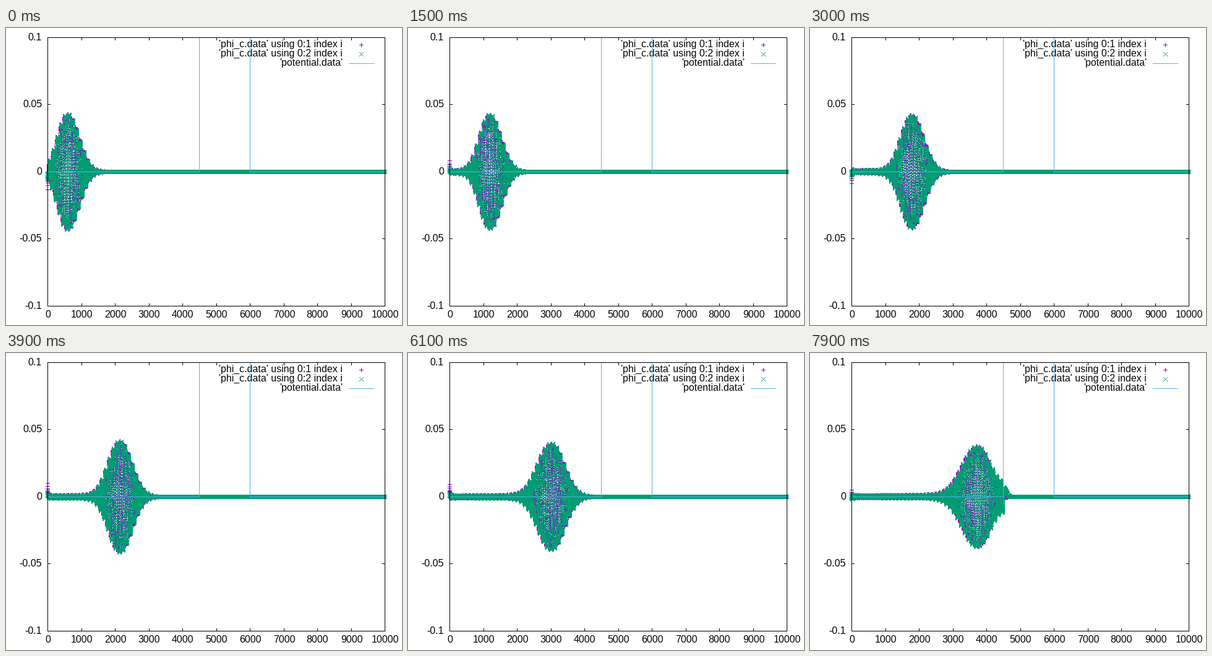
A matplotlib script that plays this animation: 640 px wide and 480 px high, repeating every 8000 ms.

```python
import numpy as np
import matplotlib.pyplot as plt
from matplotlib.animation import FuncAnimation
from matplotlib.patches import Rectangle
from matplotlib.path import Path

W, H, DPI = 640, 480, 80
PX = 72 / DPI                       # one pixel in points
LEFT, RIGHT, TOP, BOTTOM, ZERO = 67, 612, 15, 449, 232
TIC = 4
PURPLE, GREEN, BLUE = "#9400d3", "#009e73", "#56b4e9"
FRAMES, WALL, WALL_END = 80, 4500, 6000
K, OMEGA = 2 * np.pi / 110, 1.137   # wave number, phase step per frame
REFLECT = np.exp(1.916j)

plt.rcParams["font.family"] = "Liberation Sans"
plt.rcParams["text.hinting"] = "default"
x = np.arange(10001.0)


def col(v):
    return np.rint(LEFT + v * (RIGHT - LEFT) / 10000)


def row(v):
    return np.rint(ZERO - v * (BOTTOM - TOP) / 0.2)


def pixel_marker(cells):
    """Marker built from unit squares, so that it stays crisp."""
    square = [(0, 0), (1, 0), (1, -1), (0, -1), (0, 0)]
    verts = [(i + a, j + b) for i, j in cells for a, b in square]
    codes = [Path.MOVETO] + [Path.LINETO] * 3 + [Path.CLOSEPOLY]
    return Path(verts, codes * len(cells))


arm = range(-3, 4)
PLUS = pixel_marker([(i, 0) for i in arm] + [(0, i) for i in arm if i])
CROSS = pixel_marker([(i, i) for i in arm] + [(i, -i) for i in arm if i])


def incoming(pos, n):
    """Packet running to the right, with a slow tail behind it."""
    d = pos - (590 + 39.8 * n)
    lead = np.hypot(325, 2.9 * n)
    trail = np.hypot(285, 4.0 * n)
    s = np.where(d > 0, lead, trail)
    env = 0.0428 / (1 + 0.14 * (n / 79) ** 2) * np.exp(-0.5 * (d / s) ** 2)
    behind = np.maximum(-d, 0) / trail
    fade = 1 - np.exp(-behind ** 2)
    env = env + 0.005 * min(1, n / 60) * np.exp(-behind / 1.6) * fade
    wave = -np.exp(1j * (K * pos - OMEGA * n))
    return env * wave + 0.0011 * fade * wave ** 2


def wave_at(n):
    psi = incoming(x, n) + REFLECT * incoming(2 * WALL - x, n)
    inside = x > WALL
    psi[inside] = psi[WALL] * np.exp(-((x[inside] - WALL) / 112) ** 2)
    psi += 0.0012 * np.exp(-x / 70) * np.exp(1j * (K * x - OMEGA * n))
    sign = 1 if n % 2 else -1
    spike = sign * 0.0105 * np.exp(-n / 150) * np.exp(-x / 3)
    return psi + spike * (1 + 0.5j)


fig = plt.figure(figsize=(W / DPI, H / DPI), dpi=DPI, facecolor="white")
ax = fig.add_axes([0, 0, 1, 1])
ax.set_xlim(0, W)
ax.set_ylim(H, 0)
ax.axis("off")


def bar(x0, y0, x1, y1, color="black", z=5):
    ax.add_patch(Rectangle((x0, y0), x1 - x0 + 1, y1 - y0 + 1,
                           facecolor=color, linewidth=0, zorder=z,
                           antialiased=False))


def label(px, base, text, ha):
    ax.text(px, base, text, ha=ha, va="baseline", fontsize=16 * PX, zorder=1.5)


def points(marker, color, z):
    return ax.plot([], [], ls="none", marker=marker, markersize=8 * PX,
                   markerfacecolor=color, markeredgecolor="none",
                   markeredgewidth=0, zorder=z)[0]


def place(line, px, py):
    # one marker per pixel is enough
    spots = np.unique(px.astype(int) * 1000 + py.astype(int))
    line.set_data(spots // 1000 + 0.25, spots % 1000 + 0.25)


# border in front of the data, ticks behind it
bar(LEFT, TOP, RIGHT, TOP)
bar(LEFT, BOTTOM, RIGHT, BOTTOM)
bar(LEFT, TOP, LEFT, BOTTOM)
bar(RIGHT, TOP, RIGHT, BOTTOM)
for v in range(0, 10001, 1000):
    c = int(col(v + 0.1))
    bar(c, BOTTOM - TIC, c, BOTTOM, z=1)
    bar(c, TOP, c, TOP + TIC, z=1)
    label(c + 0.5, 468, str(v), "center")
for v, name in zip((0.1, 0.05, 0, -0.05, -0.1),
                   ("0.1", "0.05", "0", "-0.05", "-0.1")):
    r = int(row(v + 1e-5))
    bar(LEFT, r, LEFT + TIC, r, z=1)
    bar(RIGHT - TIC, r, RIGHT, r, z=1)
    label(58, r + 5, name, "right")

# potential: two walls and the floor outside them
a, b = int(col(WALL)), int(col(WALL_END))
bar(LEFT, ZERO, a, ZERO, BLUE, 4)
bar(a, TOP, a, ZERO, BLUE, 4)
bar(b, TOP, b, ZERO, BLUE, 4)
bar(b, ZERO, RIGHT, ZERO, BLUE, 4)

# key
names = ("'phi_c.data' using 0:1 index i",
         "'phi_c.data' using 0:2 index i", "'potential.data'")
for i, name in enumerate(names):
    label(544, 31 + 15 * i, name, "right")
place(points(PLUS, PURPLE, 2), np.array([574]), np.array([27]))
place(points(CROSS, GREEN, 2), np.array([574]), np.array([42]))
bar(554, 57, 594, 57, BLUE, 4)

real = points(PLUS, PURPLE, 2)
imag = points(CROSS, GREEN, 3)
columns = col(x)


def update(n):
    psi = wave_at(n)
    place(real, columns, row(psi.real))
    place(imag, columns, row(psi.imag))
    return real, imag


anim = FuncAnimation(fig, update, frames=FRAMES, interval=100,
                     repeat=True, repeat_delay=0, blit=False)
plt.show()
```
